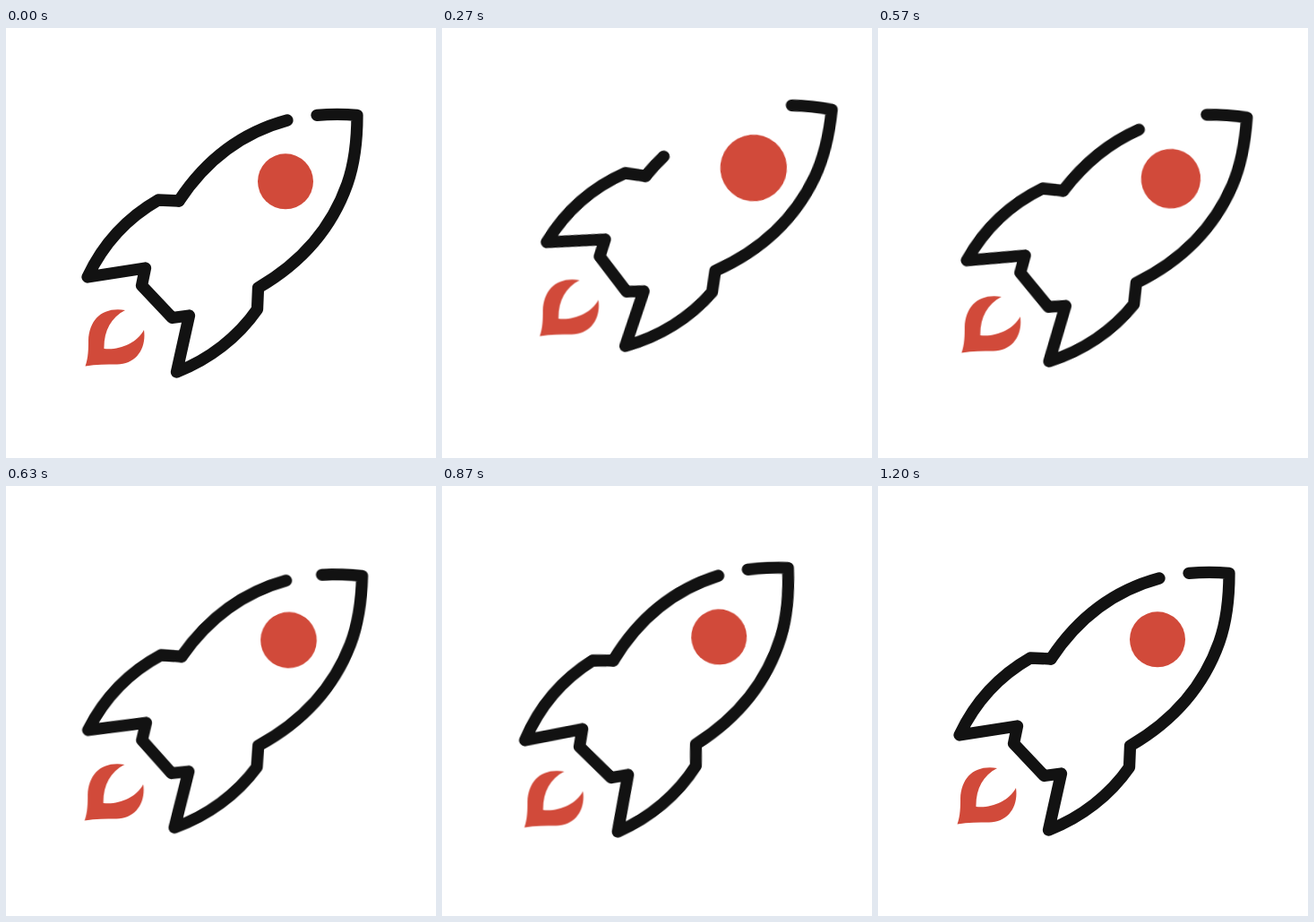
These frames come from a looping animation (480x480 px, 1530 ms). An HTML page:

```html
<!DOCTYPE html>
<html lang="en">
<head>
<meta charset="utf-8">
<title>Rocket</title>
<style>
  html, body {
    margin: 0;
    width: 100%;
    height: 100%;
    overflow: hidden;
    background: #fff;
  }
  svg { display: block; width: 100%; height: 100%; }

  .line {
    fill: none;
    stroke: #121212;
    stroke-width: 13.3;
    stroke-linecap: round;
    stroke-linejoin: round;
  }
  .red { fill: #d14a3a; }

  .fly, .tilt, .flame, .window, .edge {
    animation: 1530ms cubic-bezier(.33, 0, .67, 1) infinite;
  }
  .fly { animation-name: fly; }
  .tilt { --dir: 1; animation-name: tilt; transform-origin: 240px 240px; }
  /* turns back against the hull, so the flame stays upright */
  .flame { --dir: -1; animation-name: tilt; transform-origin: 145px 325px; }
  .window { animation-name: grow; transform-origin: 312px 171.3px; }
  .edge { animation-name: trim; stroke-dasharray: 155 155; }

  @keyframes fly {
    0%, 43.4%, 100% { transform: translate(0, 0); }
    13.5%, 28.3% { transform: translate(29px, -23px); }
  }
  @keyframes grow {
    0%, 43.4%, 100% { transform: scale(1); }
    13.5%, 28.3% { transform: scale(1.2); }
  }
  @keyframes trim {
    0%, 43.4%, 100% { stroke-dashoffset: 0; }
    13.5%, 28.3% { stroke-dashoffset: 125; }
  }
  @keyframes tilt {
    0%, 78.43%, 100% { transform: rotate(0deg); }
    19.6% { transform: rotate(calc(var(--dir) * 6.2deg)); }
    26.14% {
      transform: rotate(calc(var(--dir) * 6.2deg));
      animation-timing-function: cubic-bezier(.61, 0, .67, 1);
    }
    52.29% { transform: rotate(calc(var(--dir) * -4deg)); }
    65.36% { transform: rotate(calc(var(--dir) * 2deg)); }
  }
</style>
</head>
<body>
<svg viewBox="0 0 480 480">
  <g class="fly">
    <g class="tilt">
      <path class="line" d="M347 97.3Q370 95.5 392 97.3C392 125 388 154 381 174C363 225 328 263 281.5 290L280.5 314C259 345 227 370 190.5 384L204.5 321L185.5 323.5L151.5 287.5L155.5 268L91 278C108 242 135 212 170 192L193 193"/>
      <path class="line edge" pathLength="155" d="M193 193C222 149 262 117 314 103"/>
      <circle class="red window" cx="312" cy="171.3" r="31"/>
      <path class="red flame" d="M88.5 377.5C92 368 92 358 92 349C93 325 108 311 133 315C117 323 109 339 109.500 358C126 360 146 352 154 337C157 358 145 375.500 124 375.500C112 375.500 101 375.500 88.500 377.500Z"/>
    </g>
  </g>
</svg>
</body>
</html>
```
